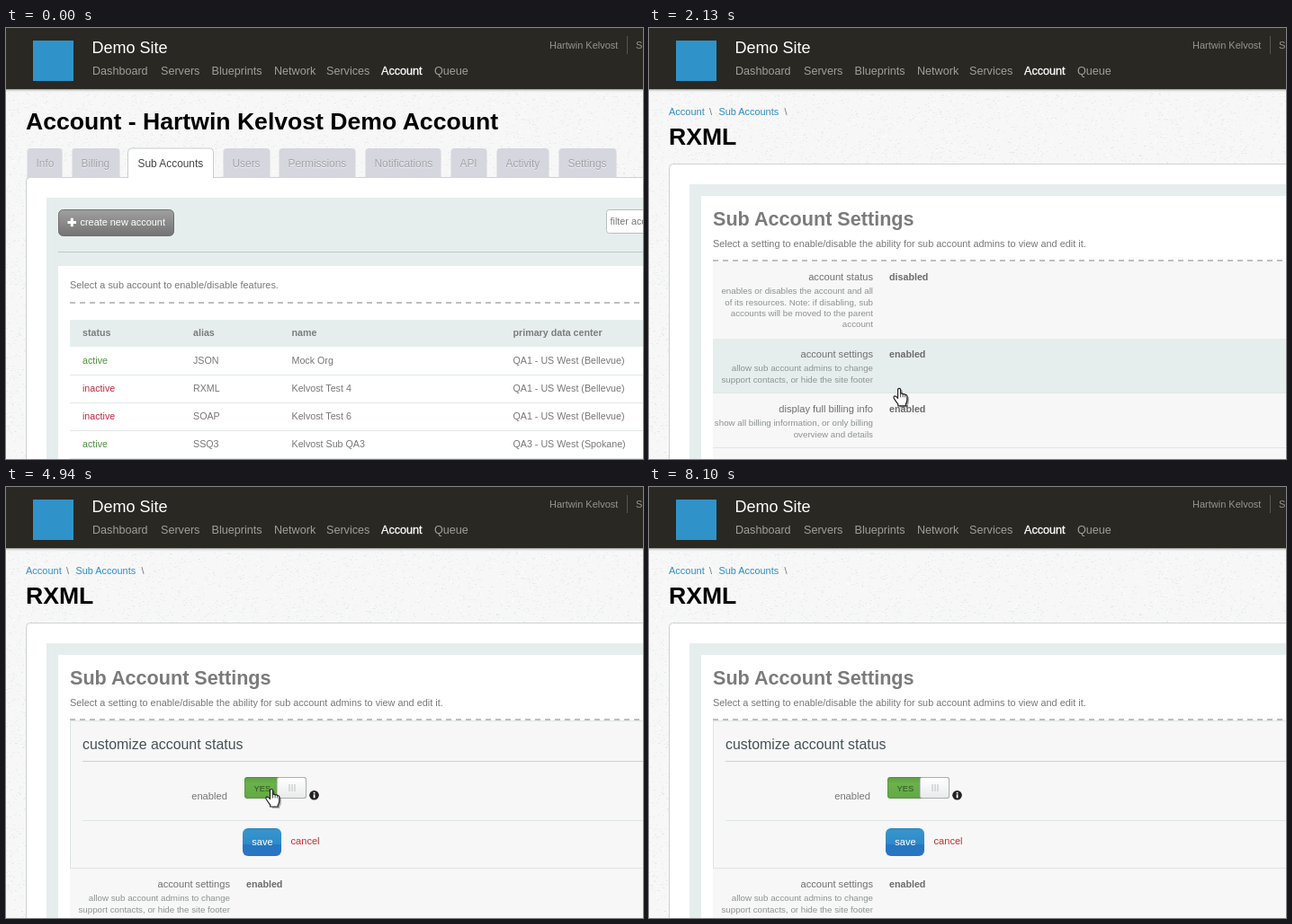
An HTML page with a canvas that plays this animation: 708x480 px, repeating every 9.13 s.

```html
<!DOCTYPE html>
<html lang="en">
<head>
<meta charset="utf-8">
<title>Sub account settings</title>
<style>
  html, body { margin: 0; width: 100%; height: 100%; overflow: hidden; background: #f7f7f7; }
  canvas, svg { position: absolute; left: 0; top: 0; width: 708px; height: 480px; }
  text { font-family: "Liberation Sans", Arial, sans-serif; white-space: pre; }
  .b { font-weight: bold; }
  .end { text-anchor: end; }
  .tip { font-family: "Open Sans", sans-serif; }
  .tab { text-shadow: 0 1px 0 #f2f2f5; }
  .strong { stroke: #fff; stroke-width: .3px; }
</style>
</head>
<body>
<canvas id="paper" width="708" height="480"></canvas>
<svg id="stage" viewBox="0 0 708 480"></svg>
<script>
const LOOP = 9130;
const MIST = '#e6eeed', GREY = '#777', LINK = '#2d8fc5';

const text = (x, y, str, size, fill, cls = '') =>
  `<text x="${x}" y="${y}" font-size="${size}" fill="${fill}" class="${cls}">${str}</text>`;
const rect = (x, y, w, h, fill, more = '') =>
  `<rect x="${x}" y="${y}" width="${w}" height="${h}" fill="${fill}" ${more}/>`;
const rule = (y, x, color) => rect(x, y, 660, 1, color);
const dashes = y =>
  `<path d="M71 ${y}H704" stroke="#bdbfbf" stroke-width="2" stroke-dasharray="6 5"/>`;
const group = (id, body) => `<g id="${id}">${body}</g>`;
const gradient = (id, ...stops) =>
  `<linearGradient id="${id}" x2="0" y2="1">${stops.map(([at, c]) =>
    `<stop offset="${at}" stop-color="${c}"/>`).join('')}</linearGradient>`;
const sheet = y => rect(22.5, y, 720, 400, '#fff', 'stroke="#cdd1d3" rx="4"');

function header() {
  const nav = [[96, 'Dashboard'], [172, 'Servers'], [228.5, 'Blueprints'], [298, 'Network'],
    [356, 'Services'], [417, 'Account'], [476, 'Queue']];
  return rect(-10, 0, 740, 68.5, '#2a2822') + rect(-10, 68.5, 740, 4, 'url(#drop)') +
    rect(30, 14, 45, 45, '#2f93c9') +
    text(95.5, 28, 'Demo Site', 18, '#fff') +
    nav.map(([x, s]) => s === 'Account'
      ? text(x, 52, s, 12.6, '#fff', 'strong')
      : text(x, 52, s, 12.6, '#a09f9a')).join('') +
    text(604, 23, 'Hartwin Kelvost', 11, '#96948e') +
    rect(690, 9, 1, 20, '#57554e') + text(700, 23, 'Support', 11, '#96948e');
}

function listPage() {
  const tabs = [[23, 40, 'Info'], [73, 54, 'Billing'], [135, 96, 'Sub Accounts'], [241, 53, 'Users'],
    [303, 86, 'Permissions'], [399, 85, 'Notifications'], [494, 41, 'API'],
    [545, 59, 'Activity'], [614, 65, 'Settings']];
  const rows = [
    ['active', 'JSON', 'Mock Org', 'QA1 - US West (Bellevue)'],
    ['inactive', 'RXML', 'Kelvost Test 4', 'QA1 - US West (Bellevue)'],
    ['inactive', 'SOAP', 'Kelvost Test 6', 'QA1 - US West (Bellevue)'],
    ['active', 'SSQ3', 'Kelvost Sub QA3', 'QA3 - US West (Spokane)']];
  const columns = [85, 208, 317.5, 563.5];
  const tab = ([x, w, s]) => {
    const active = s === 'Sub Accounts';
    const edge = `M${x + .5} 167V138q0-4 4-4H${x + w - 4.5}q4 0 4 4V167`;
    return `<path d="${edge}" fill="${active ? '#fff' : '#d5d6de'}" ${active ? 'stroke="#c9cdd0"' : ''}/>` +
      text(x + (active ? 11.5 : 10.5), 155, s, 11.9, active ? '#444' : '#a3a3a9', active ? '' : 'tab');
  };
  return text(22, 113, 'Account - Hartwin Kelvost Demo Account', 26.6, '#000', 'b') +
    sheet(166.5) + tabs.map(tab).join('') +
    rect(45, 189, 700, 300, MIST) +
    rect(58.5, 202.5, 128, 29, 'url(#steel)', 'rx="5" stroke="#707070"') +
    rect(68.5, 215, 9.5, 3, '#fff') + rect(71.8, 211.7, 3, 9.5, '#fff') +
    text(82.5, 220, 'create new account', 10.9, '#fff') +
    rect(667.5, 202.5, 120, 26, '#fff', 'rx="3" stroke="#b9bdbd"') +
    text(671.5, 219, 'filter accounts', 10.8, GREY) +
    rule(249, 58, '#c0c6c6') + rect(58, 265, 700, 300, '#fff') +
    text(71, 290, 'Select a sub account to enable/disable features.', 10.9, GREY) + dashes(306) +
    rect(71, 325, 660, 30, MIST) +
    ['status', 'alias', 'name', 'primary data center']
      .map((s, i) => text(columns[i], 343, s, 10.7, '#7c7c7c', 'b')).join('') +
    rect(71, 0, 660, 31, MIST, 'id="listHover"') +
    rows.map((cells, r) => rule(386 + 31 * r, 71, '#e3e8e8') + cells.map((s, i) =>
      text(columns[i], 374 + 31 * r, s, 10.7,
        i ? GREY : s === 'active' ? '#4f8f40' : '#c22740')).join('')).join('');
}

const crumbs = () =>
  text(22, 97, 'Account', 11, LINK) + text(67, 97, '\\', 11, GREY) +
  text(77.5, 97, 'Sub Accounts', 10.9, LINK) + text(150.5, 97, '\\', 11, GREY) +
  text(22, 130, 'RXML', 26.6, '#000', 'b');

function setting(y, h, name, value, help, id) {
  return rect(71, y, 660, h, '#f7f7f7', `id="${id}"`) + rule(y + h, 71, '#e2e5e5') +
    text(249, y + 21, name, 11.15, '#707070', 'end') +
    text(267, y + 21, value, 10.7, '#6c6c6c', 'b') +
    help.map((s, i) => text(249, y + 36.3 + 12.3 * i, s, 9.75, '#8e9292', 'end')).join('');
}

function settingsPage() {
  const status = setting(260, 86, 'account status', 'disabled',
    ['enables or disables the account and all', 'of its resources. Note: if disabling, sub',
     'accounts will be moved to the parent', 'account'], 'row0');
  const others = setting(346, 60, 'account settings', 'enabled',
      ['allow sub account admins to change', 'support contacts, or hide the site footer'], 'row1') +
    setting(407, 60, 'display full billing info', 'enabled',
      ['show all billing information, or only billing', 'overview and details'], 'row2') +
    rect(71, 468, 660, 90, '#f7f7f7');
  return sheet(151.5) + rect(45, 174, 700, 320, MIST) +
    rect(58, 187, 700, 320, '#fff') +
    text(71, 220, 'Sub Account Settings', 21.6, '#7b7b7b', 'b') +
    text(71, 244, 'Select a setting to enable/disable the ability for sub account admins to view and edit it.', 10.9, GREY) +
    group('status', status) + group('others', others) + group('editor', editor()) + dashes(259);
}

function editor() {
  const grips = [-3, 0, 3].map(d => rect(16.5 + d, 331, 1, 8, '#bcc0c0')).join('');
  const slider = rect(-80, 323, 96, 24, 'url(#green)') + rect(16, 323, 90, 24, 'url(#dim)') +
    text(-25.5, 338.5, 'YES', 9.3, '#2f5222') + text(45, 338.5, 'NO', 9.3, '#555') +
    rect(.5, 323.5, 32, 23, 'url(#knob)', 'rx="2" stroke="#c3c7c7"') + grips;
  return rect(71.5, 260.5, 700, 164, '#f7f7f7', 'stroke="#dfe4e4"') +
    text(85, 292, 'customize account status', 15.9, '#465256') + rule(305, 85, '#c9d4d4') +
    text(246, 347.5, 'enabled', 11.2, '#777', 'end') +
    `<g clip-path="url(#slot)">${group('slider', slider)}</g>` +
    rect(265.5, 323.5, 68, 23, 'none', 'rx="3" stroke="#000" stroke-opacity=".12"') +
    '<circle cx="342.5" cy="343.3" r="5.3" fill="#222"/>' +
    rect(341.7, 342.3, 1.8, 4, '#fff') + rect(341.7, 339.9, 1.8, 1.6, '#fff') +
    rule(371, 85, '#dde5e5') +
    rect(263, 380, 43, 31, 'url(#blue)', 'rx="6"') +
    text(273.3, 399, 'save', 11, '#fff') + text(316.5, 398, 'cancel', 11.1, '#c62f2f');
}

const pointers =
  group('tooltip', rect(280, 424, 31, 18, '#000', 'rx="1" opacity=".22"') +
    rect(279, 423, 31, 18, '#000', 'rx="1" opacity=".25"') +
    rect(277.5, 421.5, 31, 17, '#fff', 'stroke="#767676"') +
    text(282, 434, 'alias', 10, '#575757', 'tip')) +
  group('hand', ['transform="translate(2 1.8)" fill="#000" opacity=".35"',
    'fill="#fff" stroke="#222" stroke-width="1.2"'].map(style =>
      `<path ${style} stroke-linejoin="round" d="M-1.5 .8Q0-.8 1.5.8V6q1.7-1 2.6.5 1.6-.8 2.5.6 2-.3 2.2 1.8V13q0 2.5-1.6 4.5V19.5H-1.3V17.5Q-3 15.500-5.600 11.500-6.700 9.300-5.200 8.600-3.600 8.300-1.500 11Z"/>`).join('') +
    '<path d="M1.500 6V10M4.100 6.500V10M6.600 7.500V10" stroke="#333" stroke-width=".9"/>') +
  group('arrow', ['transform="translate(2 1.8)" fill="#000" opacity=".32"',
    'fill="#fff" stroke="#222"'].map(style =>
      `<path ${style} d="M.5.8V14.500L3.700 11.600 6 16.600 8.200 15.600 6 10.800H10.400Z"/>`).join(''));

const defs = '<defs>' +
  gradient('drop', [0, '#bfc1c0'], [.4, '#e4e6e6'], [1, '#f7f7f700']) +
  gradient('steel', [0, '#a0a0a0'], [1, '#737373']) +
  gradient('green', [0, '#5c9f40'], [.3, '#6bb14d'], [1, '#62a845']) +
  gradient('dim', [0, '#848484'], [.3, '#949494'], [1, '#8f8f8f']) +
  gradient('knob', [0, '#fff'], [.5, '#f4f6f6'], [1, '#e6eae9']) +
  gradient('blue', [0, '#2f86c0'], [.08, '#3695cd'], [.56, '#2f8ac9'], [.6, '#2577c2'], [1, '#2a74c3']) +
  '<clipPath id="slot"><rect x="265" y="323" width="69" height="24" rx="3"/></clipPath></defs>';

document.getElementById('stage').innerHTML = defs +
  group('scene', header() + group('list', listPage()) +
    group('detail', crumbs() + group('blank', rect(22.5, 151.5, 740, 31, '#fff', 'stroke="#cdd1d3" rx="4"')) +
      group('settings', settingsPage()))) + pointers;

function paintPaper() {
  const ctx = document.getElementById('paper').getContext('2d');
  let seed = 7;
  const random = () => (seed = (seed * 16807) % 2147483647) / 2147483647;
  ctx.fillStyle = '#f7f7f7';
  ctx.fillRect(0, 0, 708, 480);
  for (let i = 0; i < 16000; i++) {
    ctx.fillStyle = random() < .75 ? 'rgba(205,214,214,.32)' : 'rgba(255,255,255,.8)';
    ctx.fillRect(random() * 708 | 0, random() * 480 | 0, 1 + random() * 2 | 0, 1);
  }
}

// Pointer hotspot: time, x, y
const track = [[560, 712, 462], [880, 278, 402], [2100, 278, 402], [2630, 288, 321], [2900, 289, 290],
  [3130, 289, 290], [3130, 292, 280], [3290, 292, 280], [3290, 291, 285], [3480, 291, 285],
  [3480, 288, 287], [3740, 288, 287], [4220, 281, 338], [4830, 281, 338], [4940, 295, 336.5],
  [5240, 315, 334.5], [5960, 315, 334.5], [6180, 284, 336], [7950, 284, 336], [8100, 590, 336]];
// Switch knob: time, x
const knob = [[4520, 265], [4820, 301], [5670, 301], [5940, 265], [6580, 265], [6890, 301]];

const swing = p => .5 - Math.cos(Math.PI * p) / 2;
function sample(keys, t) {
  const i = keys.findIndex(k => k[0] > t);
  if (i === 0) return keys[0].slice(1);
  if (i < 0) return keys[keys.length - 1].slice(1);
  const a = keys[i - 1], b = keys[i], p = swing((t - a[0]) / (b[0] - a[0]));
  return a.slice(1).map((v, n) => v + (b[n + 1] - v) * p);
}

const ui = {};
document.querySelectorAll('[id]').forEach(el => ui[el.id] = el);
const show = (el, on) => el.style.display = on ? '' : 'none';
const move = (el, x, y) => el.setAttribute('transform', `translate(${x} ${y})`);

function render(t) {
  const onList = t < 1110, loaded = t >= 1740, editing = t >= 3480;
  const [x, y] = sample(track, t);
  const visible = t >= 560 && t < 8100;

  move(ui.scene, !onList && !loaded ? 8 : 0, 0);
  show(ui.list, onList);
  show(ui.detail, !onList);
  show(ui.blank, !loaded);
  show(ui.settings, loaded);
  show(ui.status, !editing);
  show(ui.editor, editing);
  move(ui.others, 0, editing ? 79 : 0);

  show(ui.listHover, visible && y > 355);
  ui.listHover.setAttribute('y', 355 + 31 * Math.floor((y - 355) / 31));
  const row = editing ? -1 : y < 346 ? 0 : y < 407 ? 1 : 2;
  [ui.row0, ui.row1, ui.row2].forEach((el, i) => el.setAttribute('fill', i === row ? MIST : '#f7f7f7'));

  move(ui.slider, sample(knob, t)[0], 0);

  const pointing = !editing || (y > 323 && x < 334);
  show(ui.hand, visible && pointing);
  show(ui.arrow, visible && !pointing);
  move(ui.hand, x, y);
  move(ui.arrow, x, y);
  show(ui.tooltip, t >= 900 && t < 2100);
  ui.tooltip.style.opacity = Math.min(1, Math.max(0, (t - 900) / 170));
}

paintPaper();
const start = performance.now();
function tick() {
  render((performance.now() - start) % LOOP);
  requestAnimationFrame(tick);
}
tick();
</script>
</body>
</html>
```
